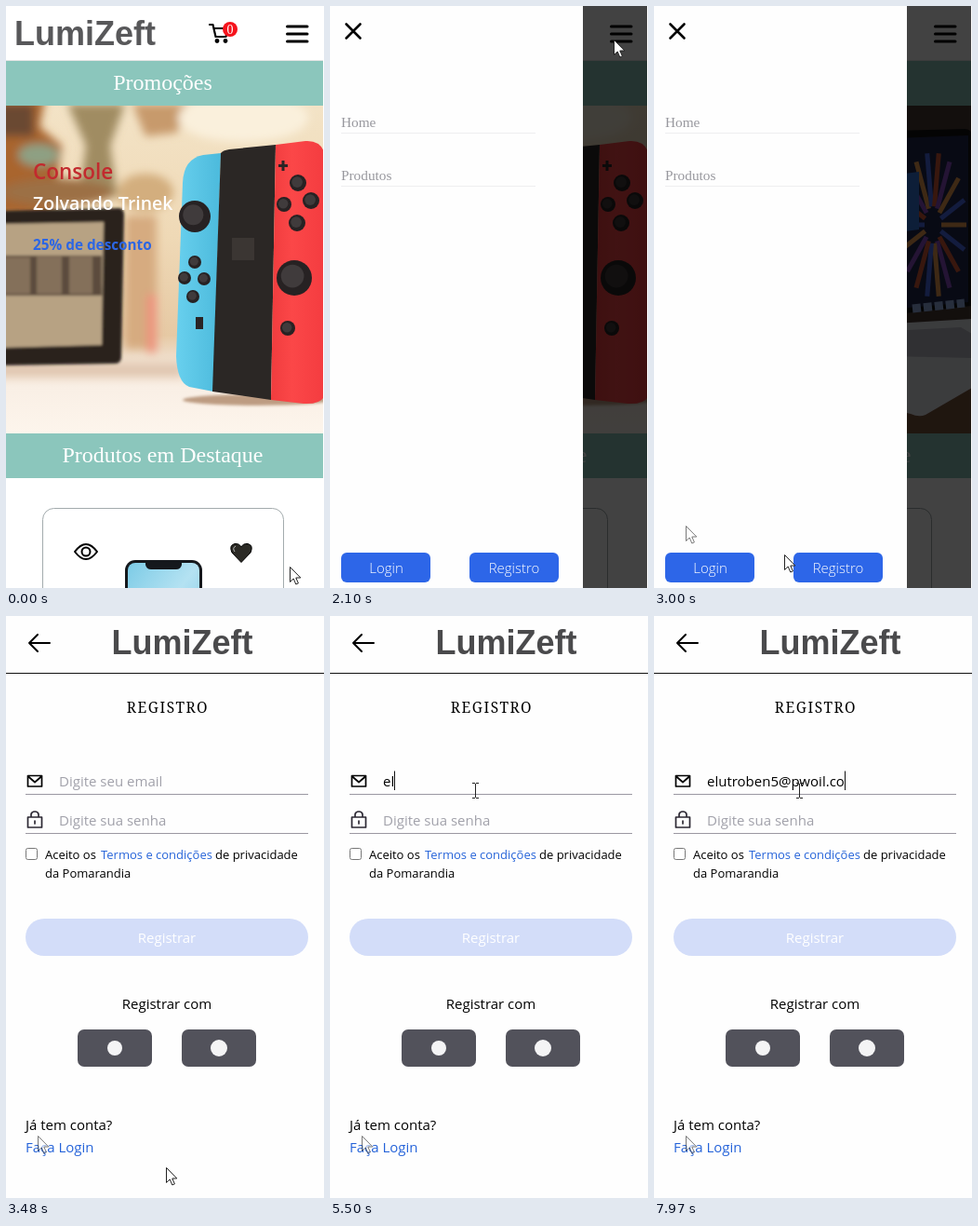
An HTML page that plays this animation: 342x625 px, repeating every 8000 ms.

```html
<!DOCTYPE html>
<html lang="pt">
<head>
<meta charset="utf-8">
<title>Loja</title>
<style>
html, body { margin: 0; width: 100%; height: 100%; overflow: hidden; background: #fff }
svg { display: block; width: 100%; height: 100% }
text { font: 15px "Open Sans", sans-serif; white-space: pre }
.brand { font: bold 36px "Liberation Sans", sans-serif }
.bar { font: 24px "Liberation Serif", serif; fill: #fff; text-anchor: middle }
.menu { font: 15.3px "Liberation Serif", serif; fill: #98989e }
.small { font-size: 13px }
.mid { text-anchor: middle }
.link { fill: #2563d9 }
.hint { fill: #a1a1aa }
.line { fill: none; stroke: #000; stroke-linecap: round; stroke-linejoin: round }
</style>
</head>
<body>
<svg viewBox="0 0 342 625">
  <defs>
    <filter id="soft" x="-20%" y="-20%" width="140%" height="140%"><feGaussianBlur stdDeviation="5"/></filter>
    <filter id="slight"><feGaussianBlur stdDeviation="1.5"/></filter>
    <clipPath id="banner"><rect y="107" width="342" height="352"/></clipPath>
    <linearGradient id="wall" x2="0" y2="1">
      <stop stop-color="#f3e3c6"/><stop offset=".4" stop-color="#efd9b6"/>
      <stop offset=".7" stop-color="#e6c9a4"/><stop offset=".76" stop-color="#eedbc6"/>
      <stop offset=".86" stop-color="#f9efe5"/><stop offset="1" stop-color="#fdf5ec"/>
    </linearGradient>
    <linearGradient id="blue"><stop stop-color="#68d0ee"/><stop offset="1" stop-color="#4cbadc"/></linearGradient>
    <linearGradient id="red"><stop stop-color="#f03c3e"/><stop offset=".4" stop-color="#fb4748"/><stop offset="1" stop-color="#f43c40"/></linearGradient>
    <linearGradient id="phone" x2="1" y2="1"><stop stop-color="#7ccbe6"/><stop offset=".5" stop-color="#b4e2f2"/><stop offset="1" stop-color="#7cc6e4"/></linearGradient>
    <path id="arrow" d="M.5 .5V16.5L4.2 13 6.8 19 9.4 17.9 6.8 12H11.8Z" fill="#fff" stroke="#222"/>
  </defs>

  <g id="home">
    <rect width="342" height="625" fill="#fff"/>
    <path d="M0 58.5H342" stroke="#e4e4e4"/>
    <text class="brand" x="9" y="41.5" fill="#58585a">LumiZeft</text>
    <path class="line" stroke-width="2.2" d="M219 20h3.5l3 13h11l2.5-9H224"/>
    <circle cx="227" cy="37.5" r="2.4"/><circle cx="236" cy="37.5" r="2.4"/>
    <circle cx="241" cy="25" r="8" fill="#f5131c"/>
    <text class="mid" x="241" y="29.5" fill="#fff" style="font:14px 'Liberation Serif',serif">0</text>
    <path class="line" stroke-width="3" d="M302.5 22H324M302.5 30H324M302.5 38H324"/>

    <g clip-path="url(#banner)"><g id="slides">
      <rect y="107" width="342" height="352" fill="url(#wall)"/>
      <g filter="url(#soft)">
        <path d="M-10 100H42L36 130 60 150 50 225H-10Z" fill="#a9652f"/>
        <path d="M-10 105H30V140H-10Z" fill="#6a4a30"/>
        <path d="M66 105H128L112 150 120 205H78L86 150Z" fill="#a08c62"/>
        <path d="M136 105H196L184 136 150 140Z" fill="#c79a6c"/>
        <ellipse cx="35" cy="160" rx="22" ry="12" fill="#8ea083"/>
        <ellipse cx="55" cy="200" rx="60" ry="15" fill="#9c7044"/>
        <ellipse cx="150" cy="200" rx="30" ry="20" fill="#d3ae7e"/>
        <ellipse cx="255" cy="120" rx="70" ry="26" fill="#faf0dc"/>
        <path d="M128 225H162V368H128Z" fill="#d6ab80"/>
        <path d="M152 310H161V372H152Z" fill="#f0907e"/>
        <path d="M-10 384H190V398H-10Z" fill="#e0c6b0"/>
      </g>
      <g filter="url(#slight)">
        <path d="M-5 220 122 217Q127 218 127 224L124 378Q123 384 117 384L-5 386Z" fill="#29231f"/>
        <path d="M-5 234 105 232 103 364-5 367Z" fill="#b7a283"/>
        <path d="M-5 268H103V311H-5Z" fill="#5b4c3e"/>
        <path d="M-5 270H26V309H-5ZM33 269H60V309H33ZM68 269H93V309H68Z" fill="#84705a"/>
        <ellipse cx="270" cy="423" rx="80" ry="6" fill="#bd9c82"/>
      </g>
      <path d="M231 158 212 160Q191 164 190 190L183 376Q184 404 197 409L223 414Z" fill="url(#blue)"/>
      <path d="M231 158Q233 155 240 154L290 149 285 423 222 414Z" fill="#2b2725"/>
      <path d="M290 149 322 145Q337 144 342 156V420Q337 428 320 427L285 423Z" fill="url(#red)"/>
      <rect x="243" y="249" width="24" height="24" fill="#3b3633"/>
      <g id="buttons" fill="#272223"></g>
      <path d="M204 334h8v13h-8ZM293 170h10v3h-10ZM296.500 166h3v11h-3Z" fill="#2a2526"/>
      <text x="29" y="186" fill="#c22a2e" style="font-size:22.500px;font-weight:600">Console</text>
      <text x="29" y="219" fill="#fff" style="font-size:19.500px;font-weight:600">Zolvando Trinek</text>
      <text x="29" y="262" fill="#2c66e4" style="font-size:15.300px;font-weight:700">25% de desconto</text>

      <g transform="translate(342)">
        <rect y="107" width="342" height="352" fill="#4b3a34"/>
        <rect y="345" width="342" height="114" fill="#79543c"/>
        <path d="M90 138 334 132Q342 132 342 140V322L90 350Z" fill="#111"/>
        <path d="M100 148 338 139V318L100 340Z" fill="#20264e"/>
        <g id="rays" stroke-width="5"></g>
        <path d="M262 181 285 178V240L262 243Z" fill="#3474d8"/>
        <path d="M278 325 334 319" stroke="#96b4e8" stroke-width="9" stroke-dasharray="9 3"/>
        <path d="M80 352 342 336V410L292 439Q285 442 276 438L80 390Z" fill="#e6e7ee"/>
        <path d="M80 358 330 345 342 352V378L80 372Z" fill="#b9bac4"/>
      </g>
    </g></g>

    <path d="M0 59H342V107H0ZM0 459H342V507H0Z" fill="#8bc6bc"/>
    <text class="bar" x="168.500" y="90">Promoções</text>
    <text class="bar" x="168.500" y="490">Produtos em Destaque</text>

    <rect x="39.500" y="539.500" width="259" height="120" rx="12" fill="#fff" stroke="#a3abad"/>
    <path class="line" stroke-width="2" d="M74 586Q86 570 98 586 86 602 74 586Z"/>
    <circle class="line" cx="86" cy="586" r="4.500" stroke-width="2"/>
    <path d="M253 597.500 243 587Q239.500 579 246 577.500 251 577 253 581 255 577 260 577.500 266.500 579 263 587Z" fill="#2b2a25" stroke="#000"/>
    <path d="M247 580Q243 582 246 586" stroke="#bbb" fill="none"/>
    <rect x="128" y="595" width="83" height="100" rx="11" fill="#15181c"/>
    <rect x="131" y="598" width="77" height="100" rx="8" fill="url(#phone)"/>
    <path d="M150 597H189V600Q188 605 183 605H156Q151 605 150 600Z" fill="#15181c"/>
  </g>

  <g id="drawer">
    <rect width="342" height="625" opacity=".74"/>
    <rect width="272" height="625" fill="#fefefe"/>
    <path class="line" stroke-width="2.600" d="M17.500 19.500 32.500 34.500M32.500 19.500 17.500 34.500"/>
    <text class="menu" x="12" y="129.500">Home</text>
    <text class="menu" x="12" y="186.500">Produtos</text>
    <path d="M12 136.500H221M12 193.500H221" stroke="#eeeef0"/>
    <rect x="12" y="587" width="96" height="32" rx="6" fill="#2d66e8"/>
    <rect x="150" y="587" width="96" height="32" rx="6" fill="#2d66e8"/>
    <g class="mid" fill="#fff">
      <text x="60.500" y="609" style="font-weight:300">Login</text>
      <text x="198" y="609" style="font-weight:300">Registro</text>
    </g>
  </g>
  <path d="M341 0H342V625H341Z" fill="#fff"/>

  <g id="register">
    <rect width="342" height="625" fill="#fefefe"/>
    <path class="line" stroke-width="2" d="M47 29H25M34 20 25 29 34 38"/>
    <text class="brand" x="113.500" y="40.500" fill="#4a4a4c">LumiZeft</text>
    <path d="M0 61.500H342" stroke="#111"/>
    <text class="mid" x="174" y="104" style="font:500 15.5px 'Noto Serif',serif;letter-spacing:1.6px">REGISTRO</text>
    <path class="line" stroke-width="1.700" d="M23.500 171.500H38.500V183H23.500ZM23.500 172 31 178.500 38.500 172"/>
    <path class="line" stroke-width="1.700" style="stroke:#2c2833" d="M23.500 216H38.500V227H23.500ZM27 216V213Q27.500 210 31 210 34.500 210 35 213V216M31 220V223"/>
    <path d="M21 191.500H325M21 233.500H325" stroke="#9b98a2"/>
    <text id="email" x="57" y="183"></text>
    <path id="caret" d="M0 166.500V187" stroke="#111"/>
    <text class="hint" x="57" y="225">Digite sua senha</text>
    <rect x="21.500" y="249.500" width="12" height="12" rx="2" fill="#fff" stroke="#777"/>
    <text class="small" x="42" y="261">Aceito os</text>
    <text class="small link" x="102" y="261">Termos e condições</text>
    <text class="small" x="225" y="261">de privacidade</text>
    <text class="small" x="42" y="281">da Pomarandia</text>
    <rect x="21" y="325" width="304" height="40" rx="20" fill="#d3ddf9"/>
    <text class="mid" x="173" y="351" fill="#fff">Registrar</text>
    <text class="mid" x="173" y="422">Registrar com</text>
    <rect x="77" y="444" width="80" height="40" rx="7" fill="#52525b"/>
    <rect x="189" y="444" width="80" height="40" rx="7" fill="#52525b"/>
    <circle cx="117" cy="464" r="8" fill="#f4f4f5"/>
    <circle cx="229" cy="464" r="9" fill="#f4f4f5"/>
    <text x="21" y="552">Já tem conta?</text>
    <text class="link" x="21" y="576">Faça Login</text>
  </g>

  <use id="trail" href="#arrow" x="34" y="558" opacity=".6"/>
  <use id="pointer" href="#arrow"/>
  <path id="beam" d="M153 179.500H156M157 179.500H160M156.500 180V195M153 195.500H156M157 195.500H160" stroke="#222" fill="none"/>
</svg>
<script>
const LOOP = 8000, MENU_AT = 1970, PAGE_AT = 3350, FOCUS_AT = 4830, BEAM_AT = 4790;
const ADDRESS = 'elutroben5@pwoil.co';
const KEY_TIMES = [5300, 5500, 5570, 5770, 5880, 5990, 6100, 6250, 6380, 6510,
  6710, 6850, 7050, 7120, 7310, 7570, 7770, 7870, 7970];
// time, x, y of the pointer tip
const POINTER = [[70, 305, 602], [410, 224, 315], [610, 224, 315], [810, 210, 304],
  [1070, 210, 304], [1350, 270, 103], [1770, 306, 35], [2100, 306, 35], [2500, 34, 558],
  [2580, 74, 578], [2720, 96, 586], [3210, 172, 592], [3610, 172, 592],
  [4090, 255, 463], [4160, 255, 463], [4830, 156, 187]];
// x, y, radius of the controls
const BUTTONS = [[203, 226, 17], [203, 275, 7], [192, 292, 7], [213, 293, 7], [201, 312, 7],
  [314, 190, 9], [299, 213, 8], [328, 209, 9], [313, 233, 9], [310, 292, 19], [303, 346, 8]];
const RAY_COLORS = ['#f0a050', '#4a6cf0', '#d85a38', '#8a4cc8'];

const $ = id => document.getElementById(id);
const show = (id, on) => $(id).style.display = on ? '' : 'none';
const clamp = v => Math.min(1, Math.max(0, v));

$('buttons').innerHTML = BUTTONS.map(([x, y, r]) =>
  `<circle cx="${x}" cy="${y}" r="${r}"/>` +
  `<circle cx="${x - r * .1}" cy="${y - r * .1}" r="${r * .65}" fill="#403b3c"/>`).join('');

// Fan of coloured strokes on the tablet screen
$('rays').innerHTML = Array.from({ length: 18 }, (_, i) => {
  const angle = i / 18 * 2 * Math.PI, x = Math.cos(angle), y = Math.sin(angle);
  return `<path d="M${300 + 9 * x} ${235 + 20 * y}L${300 + 36 * x} ${235 + 78 * y}" stroke="${RAY_COLORS[i % 4]}"/>`;
}).join('');

function pointerAt(t) {
  const next = POINTER.findIndex(p => p[0] > t);
  if (next === 0) return POINTER[0].slice(1);
  if (next < 0) return POINTER.at(-1).slice(1);
  const [a, b] = [POINTER[next - 1], POINTER[next]];
  const k = (t - a[0]) / (b[0] - a[0]);
  return [a[1] + (b[1] - a[1]) * k, a[2] + (b[2] - a[2]) * k];
}

function draw(t) {
  show('home', t < PAGE_AT);
  show('drawer', t >= MENU_AT && t < PAGE_AT);
  show('register', t >= PAGE_AT);
  show('trail', t >= 2560);
  show('pointer', t < BEAM_AT);
  show('beam', t >= BEAM_AT);
  show('caret', t >= FOCUS_AT);

  const k = clamp((t - 2180) / 350);
  $('slides').setAttribute('transform', `translate(${-342 * k * k * (3 - 2 * k)})`);
  $('pointer').setAttribute('transform', `translate(${pointerAt(t).map(Math.round)})`);

  const typed = KEY_TIMES.filter(time => time <= t).length;
  const email = $('email');
  email.textContent = typed ? ADDRESS.slice(0, typed) : 'Digite seu email';
  email.setAttribute('class', typed ? '' : 'hint');
  const width = typed && t >= PAGE_AT ? email.getComputedTextLength() : 0;
  $('caret').setAttribute('transform', `translate(${Math.round(57 + width) + .5})`);
}

const start = performance.now();
function tick() {
  draw((performance.now() - start) % LOOP);
  requestAnimationFrame(tick);
}
tick();
</script>
</body>
</html>
```
